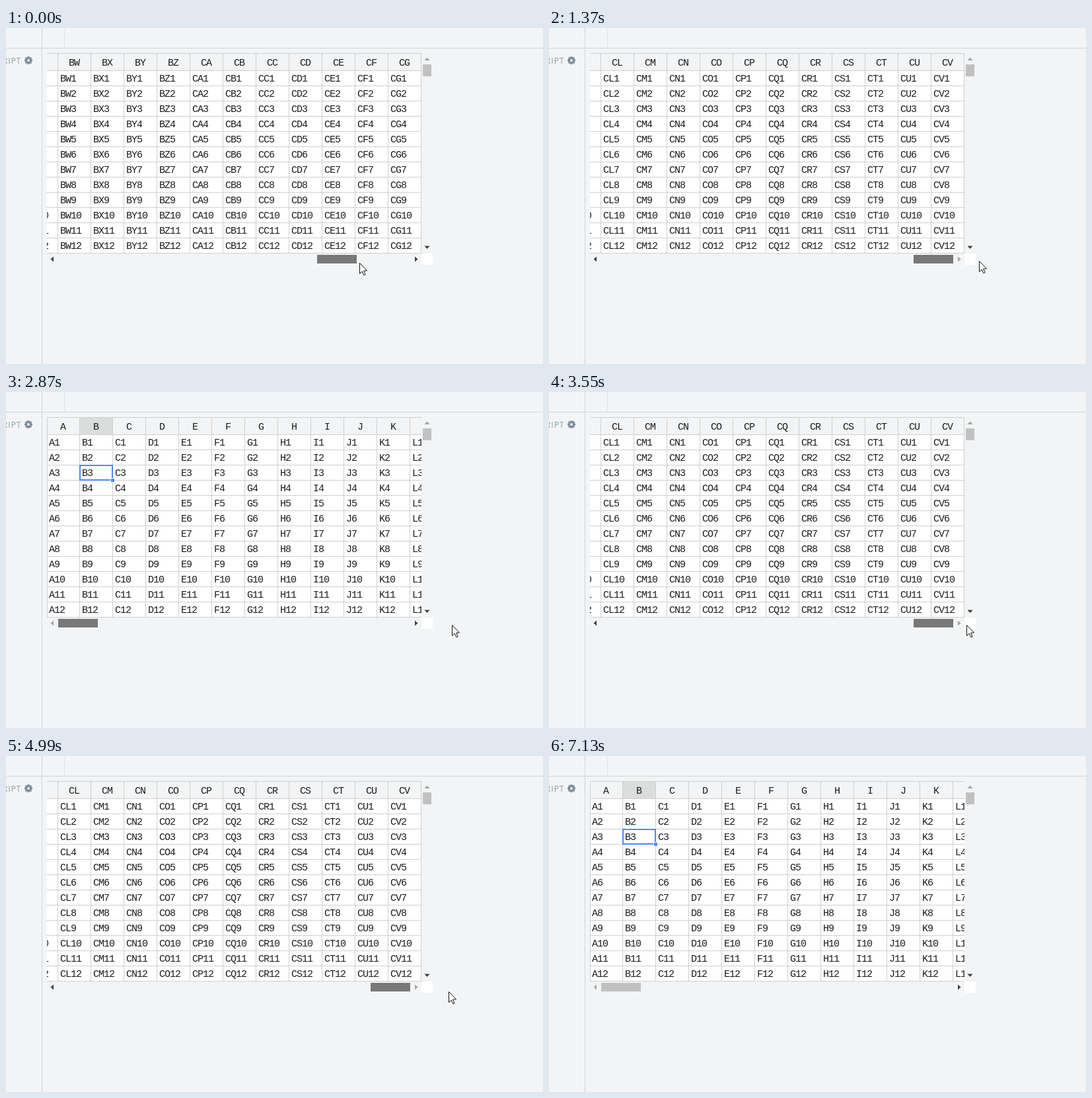
An HTML page with a canvas that plays this animation: 813x508 px, repeating every 7.78 s.

```html
<!DOCTYPE html>
<html lang="en">
<head>
<meta charset="utf-8">
<title>Wide table scrolling</title>
<style>
  html, body { margin: 0; width: 100%; height: 100%; overflow: hidden; background: #f3f4f6; }
  canvas { display: block; }
</style>
</head>
<body>
<canvas id="stage" width="813" height="508"></canvas>
<script>
const ctx = document.getElementById('stage').getContext('2d');
const LOOP = 7780, RELEASE = 6420, LEAVE = 7130;
const COL = 50, ROW = 23, ROWS = 12, COLS = 100, CHAR = 8;
const VIEW = { x: 62, y: 38, right: 629, bottom: 341, head: 64 };
const MAX = 4433, TRACK = 79, THUMB = 60, TRAVEL = 473;
const BACK = '#f3f4f6', LINE = '#cfcfcf', RULE = '#cfd6db';
const BLUE = '#4b89ff', DARK = '#404040', PALE = '#a6a6a6', GEAR = '#7b8d9d';

// Pointer drags: first step, last step (ms), then where the drag ends.
const HOME = { x: 535, y: 355 };
const legs = [
  [120, 540, 604, 352],
  [970, 1490, 663, 352],
  [2080, 2590, 622, 352],
  [2870, 2870, 675, 352],
  [3270, 3550, 632, 352],
  [3830, 4130, 685, 354],
  [4570, 4690, 664, 355],
  [4990, 5110, 676, 357],
  [5540, 5690, 646, 354],
  [5840, 6110, 688, 354],
  [6570, 6980, 760, 503]
];
const STEP = 135;

// The table catches up with the drag, then flips between its far end and its start.
const CATCH_UP = 1370;
const flips = [1490, 2080, 2870, 3270, 3980, 4570, 5110, 5690, 6110];

function pointerAt(t) {
  let { x, y } = HOME;
  for (const [from, to, endX, endY] of legs) {
    if (t < from) break;
    const gaps = Math.round((to - from) / STEP);
    const done = t >= to ? 1 : (Math.floor((t - from) / (to - from) * gaps) + 1) / (gaps + 1);
    x += (endX - x) * done;
    y += (endY - y) * done;
  }
  return { x: Math.round(x), y: Math.round(y) };
}

function scrollAt(t, pointerX) {
  if (t >= CATCH_UP) return flips.filter(f => f <= t).length % 2 ? 0 : MAX;
  const grip = HOME.x - 471;
  const raw = (Math.min(pointerX, 587) - grip - TRACK) / TRAVEL * MAX;
  return MAX - COL * Math.round((MAX - raw) / COL);
}

function box(x, y, w, h, color) {
  ctx.fillStyle = color;
  ctx.fillRect(x, y, w, h);
}

function shape(points, color) {
  ctx.beginPath();
  points.forEach(([x, y]) => ctx.lineTo(x, y));
  ctx.closePath();
  ctx.fillStyle = color;
  ctx.fill();
}

// Scrollbar arrow with its tip at (x, y), pointing along (dx, dy).
function arrow(x, y, dx, dy, color) {
  const bx = x - 4.5 * dx, by = y - 4.5 * dy;
  shape([[x, y], [bx + 4 * dy, by + 4 * dx], [bx - 4 * dy, by - 4 * dx]], color);
}

function colName(k) {
  const last = String.fromCharCode(65 + k % 26);
  return k < 26 ? last : colName(Math.floor(k / 26) - 1) + last;
}

// Every character sits centred in a fixed-pitch slot.
function gridText(text, x, baseline) {
  [...text].forEach((ch, i) => ctx.fillText(ch, x + (i + 0.5) * CHAR, baseline));
}

function drawGear(x, y) {
  ctx.save();
  ctx.translate(x, y);
  for (let i = 0; i < 4; i++) {
    box(-1.5, -6, 3, 12, GEAR);
    ctx.rotate(Math.PI / 4);
  }
  ctx.beginPath();
  ctx.arc(0, 0, 4.8, 0, 7);
  ctx.fill();
  ctx.beginPath();
  ctx.arc(0, 0, 2, 0, 7);
  ctx.fillStyle = BACK;
  ctx.fill();
  ctx.restore();
}

function drawPage() {
  box(0, 0, 813, 508, BACK);
  box(0, 30, 813, 1, RULE);
  box(54, 0, 1, 508, RULE);
  box(88, 0, 1, 30, '#e3e7ea');
  ctx.font = '12px "Open Sans", sans-serif';
  ctx.letterSpacing = '1px';
  ctx.textAlign = 'right';
  ctx.fillStyle = '#87a09e';
  ctx.fillText('RIPT', 23.5, 53.5);
  ctx.letterSpacing = '0px';
  drawGear(34, 49);
}

function drawTable(scroll) {
  const { x, y, right, bottom, head } = VIEW;
  const origin = x - 1 - scroll;
  ctx.save();
  ctx.beginPath();
  ctx.rect(x, y, right - x, bottom - y);
  ctx.clip();
  box(x, y, right - x, head - y, '#f3f4f5');
  box(x, head, right - x, bottom - head, '#fff');
  box(origin + COL, y, COL, head - y, '#dbdddc');
  box(x, y, right - x, 1, LINE);
  for (let r = 0; r <= ROWS; r++) box(x, head + r * ROW, right - x, 1, LINE);

  ctx.font = '15px "Liberation Mono", monospace';
  ctx.textAlign = 'center';
  const first = Math.max(0, Math.floor(scroll / COL) - 1);
  for (let k = first; k < Math.min(COLS, first + 14); k++) {
    const left = origin + k * COL;
    const name = colName(k);
    box(k ? left : left + 1, y, 1, bottom - y, LINE);
    box(left + COL, y, 1, bottom - y, LINE);
    ctx.fillStyle = '#1c1c1c';
    gridText(name, left + 25.5 - name.length * CHAR / 2, 57);
    for (let r = 1; r <= ROWS; r++) gridText(name + r, left + 4.5, 58 + r * ROW);
  }

  const cell = origin + COL;
  ctx.strokeStyle = BLUE;
  ctx.lineWidth = 2;
  ctx.strokeRect(cell + 1, 111, 49, 22);
  box(cell + 47, 130, 7, 7, '#fff');
  box(cell + 48, 131, 5, 5, BLUE);
  ctx.restore();
}

function drawBars(scroll, held) {
  const thumb = TRACK + Math.floor(scroll / MAX * TRAVEL);
  box(thumb, 343, THUMB, 13, held ? '#787878' : '#c1c1c1');
  arrow(67.5, 349.5, -1, 0, scroll > 0 ? DARK : PALE);
  arrow(623.5, 349.5, 1, 0, scroll < MAX ? DARK : PALE);
  box(631, 55, 13, 18, '#c1c1c1');
  arrow(637.5, 44.5, 0, -1, PALE);
  arrow(637.5, 334, 0, 1, DARK);
  box(629, 341, 17, 17, '#fff');
}

function drawPointer({ x, y }) {
  ctx.save();
  ctx.translate(x + 0.5, y + 0.5);
  shape([[0, 0], [0, 16], [3.7, 12.6], [6.4, 18.3], [8.7, 17.3], [6.1, 11.7], [11, 11.4]], '#fff');
  ctx.strokeStyle = '#111';
  ctx.lineWidth = 1;
  ctx.stroke();
  ctx.restore();
}

function draw(now) {
  const t = now % LOOP;
  const pointer = pointerAt(t);
  const scroll = scrollAt(t, pointer.x);
  drawPage();
  drawTable(scroll);
  drawBars(scroll, t < RELEASE);
  if (t < LEAVE) drawPointer(pointer);
}

const start = performance.now();
function tick() {
  draw(performance.now() - start);
  requestAnimationFrame(tick);
}
tick();
</script>
</body>
</html>
```
